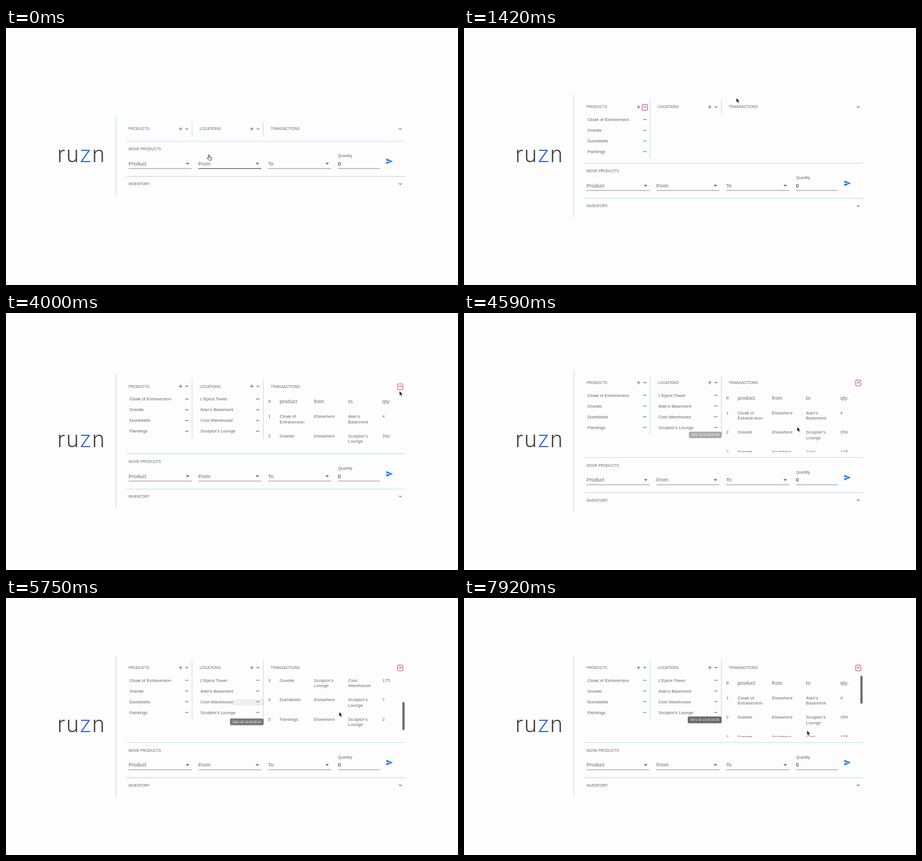
An HTML page for the animation above (8 s loop, 800 by 456 pixels).

```html
<!DOCTYPE html>
<html lang="en">
<head>
<meta charset="utf-8">
<title>Stock mover</title>
<style>
html, body { margin: 0; width: 100%; height: 100%; overflow: hidden; background: #fdfdfd; }
svg { display: block; width: 100vw; height: 100vh; }
text { font-family: "Liberation Sans", Arial, sans-serif; fill: #666; }
.cap { font-size: 6.5px; }
.item { font-size: 7.8px; }
.cell { font-size: 7.7px; letter-spacing: .12px; }
.head { font-size: 9px; letter-spacing: .15px; }
.field { font-size: 9.1px; }
.small { font-size: 6.7px; }
.tip { font-size: 5.55px; fill: #fff; }
.name { font: 300 40px Roboto, sans-serif; letter-spacing: 2.2px; fill: #3d3d40; }
.rule { stroke: #c2daf5; stroke-width: 1.1; }
.icon { stroke: #6c6c6c; stroke-width: 1.1; fill: none; }
.under { stroke: #8e8e8e; stroke-width: 1; }
.under.hot { stroke: #555; stroke-width: 1.2; }
</style>
</head>
<body>
<svg id="stage" viewBox="0 0 800 456" xmlns="http://www.w3.org/2000/svg"></svg>
<script>
const LOOP = 8000, STEP = 1000 / 12;
const LIST_H = 80, TABLE_H = 111;
const ROW = 34.5, ROW_TOP = 53.5;
const TIP_LAG = 60, TIP_FADE = 200;

const caretX = [320, 446, 697.8];
const openAt = [1178, 2245, 3818];

const products = ["Cloak of Extraversion", "Granite", "Dumbbells", "Paintings"];
const places = ["L'Epice Tower", "Alan's Basement", "Cool Warehouse", "Sculptor's Lounge"];
// product, from, to, quantity, second of entry
const moves = [
  [0, null, 1, 4, 24], [1, null, 3, 350, 28], [1, 3, 2, 175, 33],
  [2, null, 3, 7, 37], [3, null, 3, 2, 44], [3, 3, 0, 1, 51]
];

// start, duration, destination
const flicks = [[4888, 779, 100], [6000, 417, 115], [6755, 625, 0]];
const pointerMoves = [
  [90, 70, 340, 207], [320, 90, 321, 190], [600, 230, 319.5, 179], [1180, 230, 482, 124],
  [1580, 330, 446, 139], [2300, 500, 697, 262], [2800, 280, 690, 194],
  [3100, 400, 697, 138], [3980, 430, 589.5, 202], [7840, 70, 607, 235]
];

const text = (x, y, s, cls, extra = "") => `<text x="${x}" y="${y}" class="${cls}" ${extra}>${s}</text>`;
const line = (x1, y1, x2, y2, cls, extra = "") =>
  `<line x1="${x1}" y1="${y1}" x2="${x2}" y2="${y2}" class="${cls}" ${extra}/>`;
const chevron = (x, y, id) => `<path id="${id}" class="icon" transform="translate(${x} ${y})" d="M-2.3-1.1 0 1.1 2.3-1.1"/>`;
const plus = x => `<path class="icon" d="M${x - 3} 0h6M${x} -3v6"/>`;
const clip = (i, x, w) => `<clipPath id="c${i}"><rect id="r${i}" x="${x}" y="12.5" width="${w}" height="0"/></clipPath>`;

const list = (items, x, i) => `<g clip-path="url(#c${i})">` + items.map((s, k) => {
  const y = 22.5 + 19 * k;
  return text(x, y + 2.8, s, "item") + line(x + 98.5, y, x + 104.5, y, "icon");
}).join("") + "</g>";

function wrap(s) {
  const i = s.lastIndexOf(" ");
  return i < 0 ? [s] : [s.slice(0, i), s.slice(i + 1)];
}
const cell = (x, y, s, extra) => wrap(s).map((w, k) => text(x, y + 9.5 * k, w, "cell", extra)).join("");
const column = i => i ? 423.7 + 60.6 * i : 464;
const tableRow = ([p, from, to, qty], i) => {
  const y = ROW_TOP + ROW * i + 2.7;
  const cells = [String(i + 1), products[p], places[from] || "Elsewhere", places[to], String(qty)];
  return cells.map((s, k) => cell(column(k), y, s, s === "Elsewhere" ? 'font-style="italic"' : "")).join("");
};
const tableHead = ["#", "product", "from", "to", "qty."]
  .map((s, i) => text(column(i), 30.2, s, "head")).join("");

const select = (s, i) => {
  const x = 217 + 123.5 * i;
  return text(x, 243.8, s, "field") + line(x, 249.3, x + 111.5, 249.3, "under", `id="u${i}"`) +
    `<path fill="#666" d="M${x + 101.3} 239.3h6.4l-3.2 3.2z"/>`;
};

const tipBox = (move, i) => `<g id="tip${i}"><rect x="-60" y="-6" width="60" height="12" rx="2" fill="#616161"/>` +
  text(-55.8, 2, "2021-02-13 00:02:" + move[4], "tip") + "</g>";

document.getElementById("stage").innerHTML = `
<defs>${clip(0, 213, 114)}${clip(1, 335, 119)}${clip(2, 459, 250)}</defs>
<rect width="800" height="456" fill="#fdfdfd"/>
<text x="91" y="238" class="name">ru<tspan fill="#2f70cc">z</tspan>n</text>
<line id="side" x1="194.5" x2="194.5" class="rule"/>
<g id="top">
  ${text(217, 2.4, "PRODUCTS", "cap")}${text(343, 2.4, "LOCATIONS", "cap")}${text(468.8, 2.4, "TRANSACTIONS", "cap")}
  ${plus(309)}${plus(435)}
  ${caretX.map((x, i) => chevron(x, 0, "v" + i)).join("")}
  ${line(329.3, -13, 329.3, 13, "rule", 'id="d0"')}${line(455.5, -13, 455.5, 13, "rule", 'id="d1"')}
  ${list(products, 218.4, 0)}${list(places, 344, 1)}
  <g clip-path="url(#c2)"><g id="table">${tableHead}${moves.map(tableRow).join("")}</g></g>
  <rect id="thumb" x="701.5" width="4" height="50" rx="2" fill="#6d6d6d"/>
  <rect id="ring" y="-4.4" width="9.2" height="10.2" rx="1.6" fill="none" stroke="#e2497c" stroke-width="1.1"/>
</g>
<g id="bottom">
  ${line(213, 201, 706.5, 201, "rule")}${line(213, 263.4, 706.5, 263.4, "rule")}
  ${text(217, 217, "MOVE PRODUCTS", "cap")}${text(217, 279, "INVENTORY", "cap")}
  ${["Product", "From", "To"].map(select).join("")}
  ${text(587.8, 229.3, "Quantity", "small")}${text(587.6, 243.8, "0", "field", 'style="fill:#111"')}
  ${line(587.8, 249.3, 661.8, 249.3, "under")}
  <path fill="#2878ea" transform="translate(672 229.8) scale(.56)" d="M2 21 23 12 2 3v7l15 2-15 2z"/>
  ${chevron(697.8, 276.6, "v3")}
</g>
${moves.map(tipBox).join("")}
<path id="arrow" fill="#111" stroke="#fff" stroke-width=".6" d="M0 0v8.2l1.9-1.7 1.5 3.1 1.5-.7-1.4-3h2.6z"/>
<path id="hand" fill="#fff" stroke="#222" stroke-width=".9" stroke-linejoin="round"
  d="M-.9 6.2V.9a.9.9 0 0 1 1.8 0v2.9l3 .6q1.2.3 1 1.6l-.6 3.6H.4L-2.6 6.4q-.3-1.6 1.7-.2zM2.3 4.2v1.6"/>`;

const el = id => document.getElementById(id);
const set = (id, attrs) => { for (const k in attrs) el(id).setAttribute(k, attrs[k]); };
const clamp = v => Math.min(1, Math.max(0, v));
const smooth = u => u * u * (3 - 2 * u);
const glide = u => 1 - (1 - u) ** 1.5;

// Ease from stop to stop.
function follow(stops, start, curve, t) {
  return stops.reduce((pos, [t0, span, ...to]) => {
    const k = curve(clamp((t - t0) / span));
    return pos.map((p, i) => p + (to[i] - p) * k);
  }, start);
}
const scrollAt = t => follow(flicks, [0], glide, t)[0];

// cubic-bezier(.4, 0, .2, 1)
function ease(x) {
  if (x <= 0 || x >= 1) return clamp(x);
  let lo = 0, hi = 1;
  for (let i = 0; i < 24; i++) {
    const u = (lo + hi) / 2, v = 1 - u;
    if (1.2 * v * v * u + .6 * v * u * u + u * u * u < x) lo = u; else hi = u;
  }
  return smooth(lo);
}

// Table row under the pointer once it rests there.
const hoveredRow = t => t < 4420 ? -1 : 1 + Math.floor((scrollAt(t) + 12.5) / ROW);

// A tooltip is as solid as the share of recent time its row was hovered.
function tipOpacity(row, t) {
  const n = 20;
  let hits = 0;
  for (let i = 0; i < n; i++) hits += hoveredRow(t - TIP_LAG - TIP_FADE * i / n) === row;
  return hits / n;
}

function draw(time) {
  const t = Math.floor((time + 1) / STEP) * STEP;
  const open = openAt.map(s => ease((t - s) / 300));
  const heights = [LIST_H * open[0], LIST_H * open[1], TABLE_H * open[2]];
  const h = Math.max(...heights), y = 179 - h / 2;

  set("side", { y1: 157 - h / 2, y2: 298 + h / 2 });
  set("top", { transform: `translate(0 ${y})` });
  set("bottom", { transform: `translate(0 ${h / 2})` });
  heights.forEach((v, i) => {
    set("r" + i, { height: v });
    set("v" + i, { transform: `translate(${caretX[i]} 0) rotate(${180 * clamp((t - openAt[i]) / 150)})` });
  });
  set("d0", { y2: 13 + heights[0] });
  set("d1", { y2: 13 + heights[1] });

  const focus = openAt.filter(s => t >= s - 50).length - 1;
  set("ring", { x: caretX[Math.max(0, focus)] - 4.6, opacity: focus < 0 ? 0 : 1 });

  const scroll = scrollAt(t), trail = scrollAt(t - TIP_LAG);
  set("table", { transform: `translate(0 ${-scroll})` });
  set("thumb", { y: 14.3 + scroll * .467, opacity: scroll > 0 || t > flicks[0][0] ? 1 : 0 });
  moves.forEach((m, i) => {
    const o = tipOpacity(i, t), ty = y + ROW_TOP + ROW * i + 4.7 - trail;
    set("tip" + i, { opacity: o * .94, transform: `translate(456 ${ty}) scale(${.92 + .08 * o})` });
  });

  const [px, py] = follow(pointerMoves, [359, 225], smooth, t);
  const onFrom = Math.abs(px - 396) < 56 && Math.abs(py - h / 2 - 236) < 14;
  const onCaret = caretX.some(x => Math.abs(px - x) < 9 && Math.abs(py - y) < 6);
  const place = `translate(${px} ${py})`;
  set("u1", { class: onFrom ? "under hot" : "under" });
  set("hand", { transform: place, opacity: onFrom || onCaret ? 1 : 0 });
  set("arrow", { transform: place, opacity: onFrom || onCaret ? 0 : 1 });
}

const start = performance.now();
function tick() {
  draw((performance.now() - start) % LOOP);
  requestAnimationFrame(tick);
}
tick();
</script>
</body>
</html>
```
